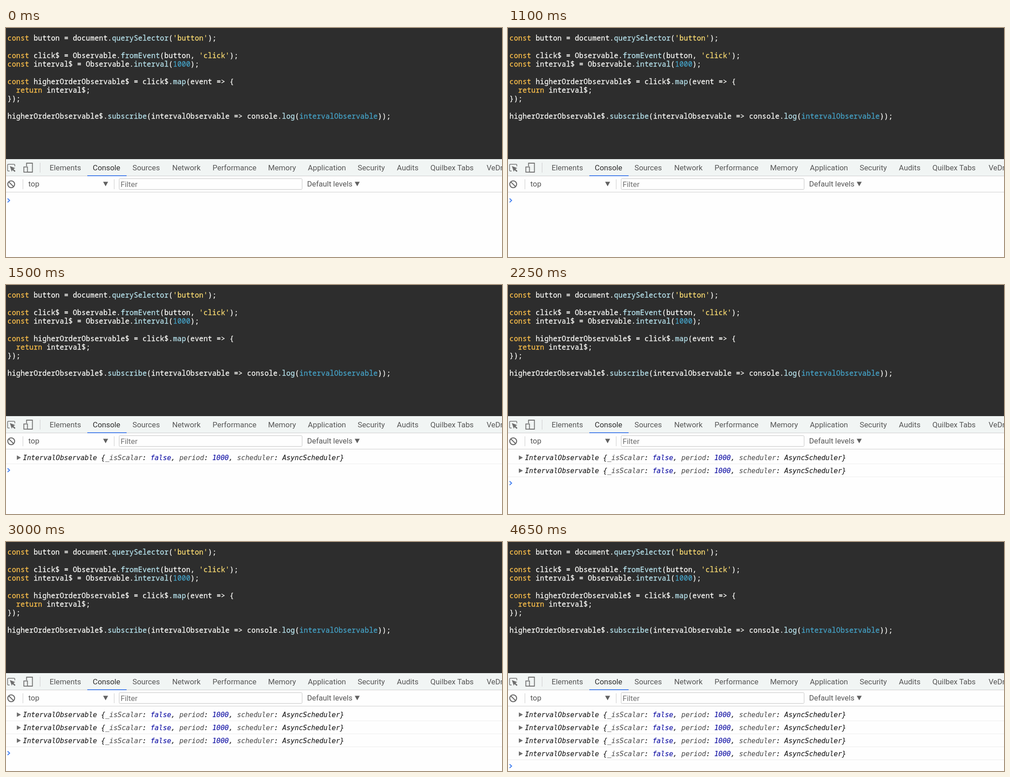
An HTML page that plays this animation: 1098x510 px, repeating every 5.25 s.

```html
<!DOCTYPE html>
<html lang="en">
<head>
<meta charset="utf-8">
<title>Higher-order observable console</title>
<style>
  html, body { margin: 0; width: 100%; height: 100%; overflow: hidden; background: #fefefe; }
  svg { display: block; width: 1098px; height: 510px; }
  text { white-space: pre; }
  tspan { fill: currentColor; stroke: currentColor; }
  .code { font: 500 15.6px "Noto Sans Mono", monospace; letter-spacing: .286px; color: #fbfbf8; stroke-width: .3; }
  .ui { font: 16.8px Roboto, sans-serif; fill: #555; }
  .log { font: italic 15.15px "DejaVu Sans Mono", monospace; color: #1f1f1f; stroke-width: .15; }
  .key { color: #fbbf4b; }
  .fn { color: #b8e4ee; }
  .str { color: #fbdc72; }
  .num { color: #45a3c8; }
  .prop { color: #565656; }
  .val { color: #1010a4; }
  .on { fill: #2e2e2e; }
  .hint { fill: #707070; }
  .icon { fill: none; stroke: #6e6e6e; }
  .rule { stroke: #ccc; }
  .row { stroke: #ebebeb; stroke-width: 1; }
</style>
</head>
<body>
<svg id="stage" viewBox="0 0 1098 510">
  <rect width="1098" height="510" fill="#fefefe"/>
  <rect width="1098" height="292" fill="#2d2d2d"/>
  <g id="code" class="code"></g>

  <rect y="292" width="1098" height="37" fill="#f1f5f4"/>
  <path class="rule" d="M0 329.5H1098M75.5 300V322M37.5 337V359M239.5 337V359"/>
  <path class="rule" d="M0 365.5H1098"/>
  <rect x="180" y="328" width="87" height="2" fill="#4a80ea"/>

  <path class="icon" stroke-width="1.5" d="M8 318.5H5Q3.5 318.5 3.5 317V305Q3.5 303.5 5 303.5H18Q19.5 303.5 19.5 305V308"/>
  <path d="M8.5 307.5L20.5 312L16.6 314L21 318.4L18.9 320.5L14.6 316.2L12.8 320Z" fill="#6e6e6e"/>
  <g class="icon" stroke-width="1.8">
    <path d="M45.5 308V301H58.5V321H48"/>
    <rect x="39.5" y="309.5" width="8" height="11.5"/>
  </g>
  <g class="icon" stroke-width="2.3">
    <circle cx="11.5" cy="348" r="7.6"/>
    <path d="M6.2 342.7L16.8 353.3"/>
  </g>
  <path d="M215 342.5H226L220.5 352.5ZM772 342.5H783L777.5 352.5Z" fill="#616161"/>
  <rect x="250.5" y="335.5" width="405" height="24" rx="2" fill="#fefefe" stroke="#c3c3c3"/>
  <g id="ui" class="ui"></g>

  <g id="logs" class="log"></g>
  <path id="prompt" d="M3.5 379.8L8 384L3.5 388.2" fill="none" stroke="#3f7df0" stroke-width="2"/>
</svg>
<script>
const LOOP = 5250, FIRST = 1500, STEP = 750, ROWS = 4, ROW_H = 28.9;
const byId = id => document.getElementById(id);

function el(parent, tag, attrs, content) {
  const node = document.createElementNS(parent.namespaceURI, tag);
  for (const name in attrs) node.setAttribute(name, attrs[name]);
  if (content !== undefined) node.textContent = content;
  return parent.appendChild(node);
}

// Parts are plain strings or [class, string] pairs.
function richText(parent, x, y, parts) {
  const line = el(parent, 'text', { x, y });
  for (const part of parts) {
    const [cls, str] = Array.isArray(part) ? part : ['', part];
    el(line, 'tspan', { class: cls }, str);
  }
}

const key = s => ['key', s], fn = s => ['fn', s], str = s => ['str', s], num = s => ['num', s];
const prop = s => ['prop', s], val = s => ['val', s];

const source = [
  [key('const'), ' button = document.', fn('querySelector'), '(', str("'button'"), ');'],
  [],
  [key('const'), ' click$ = Observable.', fn('fromEvent'), '(button, ', str("'click'"), ');'],
  [key('const'), ' interval$ = Observable.', fn('interval'), '(', num('1000'), ');'],
  [],
  [key('const'), ' higherOrderObservable$ = click$.', fn('map'), '(event => {'],
  ['  ', key('return'), ' interval$;'],
  ['});'],
  [],
  ['higherOrderObservable$.', fn('subscribe'), '(intervalObservable => console.', fn('log'), '(',
    num('intervalObservable'), '));']
];
source.forEach((parts, i) => richText(byId('code'), 3.3, 28.4 + i * 19.27, parts));

const tabs = [
  ['Elements', 96.5], ['Console', 192, 'on'], ['Sources', 280], ['Network', 368],
  ['Performance', 457.3], ['Memory', 580.3], ['Application', 668.3], ['Security', 778.5],
  ['Audits', 865.3], ['Quilbex Tabs', 939.5], ['VeDrilo', 1064]
];
const label = (s, x, y, cls = '') => el(byId('ui'), 'text', { x, y, class: cls }, s);
tabs.forEach(([s, x, cls]) => label(s, x, 316.7, cls));
label('top', 49.5, 353.4);
label('Filter', 253.7, 354, 'hint');
label('Default levels', 666.5, 353.4);

const entry = [
  'IntervalObservable {', prop('_isScalar'), ': ', val('false'), ', ', prop('period'), ': ',
  val('1000'), ', ', prop('scheduler'), ': AsyncScheduler}'
];
const rows = Array.from({ length: ROWS }, (_, i) => {
  const row = el(byId('logs'), 'g', { transform: `translate(0 ${i * ROW_H})` });
  el(row, 'path', { d: 'M24 379.5L33 384.5L24 389.5Z', fill: '#6e6e6e' });
  richText(row, 37.4, 390, entry);
  el(row, 'path', { d: 'M0 398.3H1098', class: 'row' });
  return row;
});

function draw(t) {
  const count = t < FIRST ? 0 : Math.min(ROWS, 1 + Math.floor((t - FIRST) / STEP));
  rows.forEach((row, i) => row.setAttribute('visibility', i < count ? 'visible' : 'hidden'));
  byId('prompt').setAttribute('transform', `translate(0 ${count && count * ROW_H - 0.5})`);
}

const start = performance.now();
function tick() {
  draw((performance.now() - start) % LOOP);
  requestAnimationFrame(tick);
}
tick();
</script>
</body>
</html>
```
